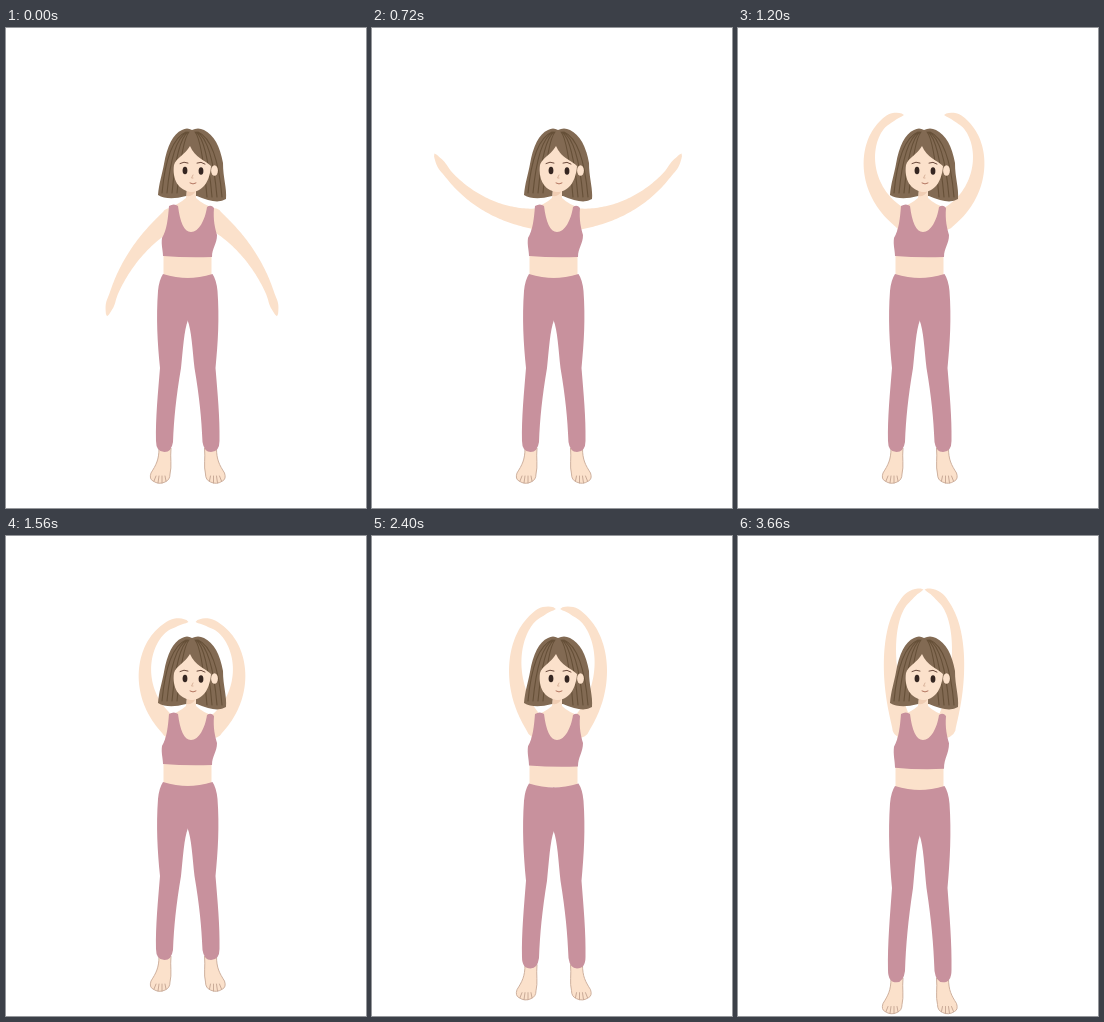
Write an HTML page that moves like this. It is 360x480 px and loops after 4500 ms.

```html
<!DOCTYPE html>
<html lang="en">
<head>
<meta charset="utf-8">
<title>Overhead stretch</title>
<style>
  html, body { margin: 0; width: 100%; height: 100%; overflow: hidden; background: #fff; }
  svg { display: block; width: 100%; height: 100%; }
  .skin { fill: #fbe1cb; }
  .cloth { fill: #c8919d; }
  .foot { fill: #fbe1cb; stroke: #c9aa97; stroke-width: .9; }
  .line { fill: none; stroke-linecap: round; }
  .strand { stroke: #665038; stroke-width: 1.1; }
</style>
</head>
<body>
<svg viewBox="0 0 360 480">
  <path id="leftArm" class="skin"/>
  <path id="rightArm" class="skin"/>

  <!-- Body: "stretch" paths lengthen during the reach; one leg is mirrored -->
  <path class="skin" d="M181,160L180,170Q172,177 163,179L158,210H209L208,180Q196,176 190,170V160Z"/>
  <path class="skin stretch" d="M157.5,222V250H205.5V222Z"/>
  <g id="leg">
    <path class="foot stretch" d="M153,420C153,432 150,437 145,445Q143,451 147,453Q153,457 159,454Q164,452 164,446C166,438 164,430 165,420Z"/>
    <path class="line stretch" stroke="#c9aa97" d="M148,453L150,448M152,455L153,448M156,455L156,448M160,453L159,448"/>
    <path class="cloth stretch" d="M182.5,250Q170,250 157,246Q153,252 152,263C150,290 151.5,315 154,340C152,365 149.5,390 150,413Q150,424 158.5,424Q165.5,424 167,414C168,390 170,370 175,340C177,322 178,302 182,292H182.5Z"/>
  </g>
  <use href="#leg" transform="matrix(-1 0 0 1 363.5 0)"/>
  <path class="cloth stretch" d="M163,178Q168,175 172,178C174,194 178,204 185,204C193,204 199,192 201,179Q205,176 208,180C207,192 209,200 211,207C211,216 206,220 206,229Q181,230 157,228C157,222 155,217 156,210C161,202 162,190 163,178Z"/>

  <!-- Head -->
  <path fill="#826a53" d="M186,102Q192,99 198,102C208,107 214,118 217,135C217,150 221,160 220,171Q211,177 191,168H180Q162,173 152,167C153,155 156,147 158,136C161,118 167,106 176,102Q181,99 186,102Z"/>
  <path id="strands" class="line strand"/>
  <path class="skin" d="M181,158L180,171Q185,174 190,171V158Z"/>
  <path fill="#f0cdb3" d="M181,162Q186,166 190,162Q187,169 181,168Z"/>
  <ellipse class="skin" cx="208.5" cy="142.5" rx="3.4" ry="5.2"/>
  <path class="skin" d="M184,118C179,127 170,130 168,137C166,151 172,163 186,164C198,163 204,152 205,138C199,132 189,130 184,118Z"/>
  <g fill="#352621">
    <ellipse cx="179" cy="142.5" rx="2.4" ry="3.8"/>
    <ellipse cx="195" cy="143" rx="2.4" ry="3.8"/>
  </g>
  <path class="line" stroke="#6b4a3c" d="M174,135.5Q178,133 182,135M191,135Q195,133 199,136"/>
  <path class="line" stroke="#d9b49c" d="M187,147L185.5,150H187"/>
  <path class="line" stroke="#b2745f" d="M184,155Q187,157 190,155"/>
</svg>
<script>
const LOOP = 4500, STEP = 30, REACH_START = 1500, REACH_END = 3630;

// An arm is a curve: "lift" is its angle at the shoulder (degrees, down is
// positive), "bend" turns it evenly and "hook" turns mostly the hand.
const poses = [
  { time: 0, lift: 36, bend: 42, hook: 0, length: 119 },
  { time: 330, lift: 18, bend: -9, hook: 0, length: 123 },
  { time: 720, lift: -4, bend: -58, hook: 0, length: 127 },
  { time: 1200, lift: -32, bend: -110, hook: -45, length: 134 },
  { time: 1350, lift: -40, bend: -112, hook: -45, length: 138 },
  { time: REACH_END, lift: -70, bend: -42, hook: -65, length: 153 }
];
const arms = [
  { el: document.getElementById('leftArm'), x: 165, y: 191, dir: -1 },
  { el: document.getElementById('rightArm'), x: 207, y: 191, dir: 1 }
];
const stretchy = [...document.querySelectorAll('.stretch')].map(el => ({ el, d: el.getAttribute('d') }));

const mix = (a, b, k) => a + (b - a) * k;
const ramp = (v, from, to) => Math.max(0, Math.min(1, (v - from) / (to - from)));
const smooth = k => k * k * (3 - 2 * k);

const reachAt = t => smooth(ramp(t, REACH_START, REACH_END));

function poseAt(t) {
  const i = Math.max(1, poses.findIndex(p => p.time > t));
  const next = t < REACH_END ? i : poses.length - 1;
  const a = poses[next - 1], b = poses[next];
  const k = b.time === REACH_END ? reachAt(t) : ramp(t, a.time, b.time);
  const pose = {};
  for (const key in a) pose[key] = mix(a[key], b[key], k);
  return pose;
}

// Tapers from the shoulder, widens at the hand and closes at the fingertips.
const halfWidth = u =>
  (11 - 8 * u ** .65 + 1.2 * Math.exp(-(((u - .9) / .06) ** 2))) * Math.sqrt(1 - u ** 16);

function armPath({ x, y, dir }, { lift, bend, hook, length }) {
  const upper = [], lower = [], n = 60;
  for (let i = 0; i <= n; i++) {
    const u = i / n, w = halfWidth(u);
    const angle = (lift + bend * u + hook * u ** 6) * Math.PI / 180;
    const dx = dir * Math.cos(angle), dy = Math.sin(angle);
    lower.push([x - dy * w, y + dx * w]);
    upper.unshift([x + dy * w, y - dx * w]);
    x += dx * length / n;
    y += dy * length / n;
  }
  const outline = [...lower, ...upper].map(p => p.map(v => v.toFixed(2)));
  return `M${outline.join('L')}A11,11 0 0 0 ${outline[0]}Z`;
}

// The waist drops a little, the legs lengthen towards the feet.
const drop = y => 4 * ramp(y, 205, 230) + 18.5 * ramp(y, 255, 425) ** 1.2;

function drawStrands() {
  let d = '';
  for (const dir of [-1, 1])
    for (let i = 0; i < 4; i++) {
      const x = dx => 186 + dir * dx;
      d += `M${x(6 - i)},104Q${x(25 - 5 * i)},112 ${x(30 - 5 * i)},${167 + dir * 2}`;
    }
  document.getElementById('strands').setAttribute('d', d);
}

function draw(t) {
  const pose = poseAt(t), reach = reachAt(t);
  for (const arm of arms) arm.el.setAttribute('d', armPath(arm, pose));
  for (const { el, d } of stretchy) {
    // Turn H and V into full points so that every y can be moved.
    el.setAttribute('d', d.replace(/([,V])([\d.]+)/g, (_, mark, y) => mark + (+y + reach * drop(+y)).toFixed(2)));
  }
}

drawStrands();
const start = performance.now();
function tick() {
  const t = (performance.now() - start) % LOOP;
  draw(Math.floor(t / STEP) * STEP);
  requestAnimationFrame(tick);
}
tick();
</script>
</body>
</html>
```
